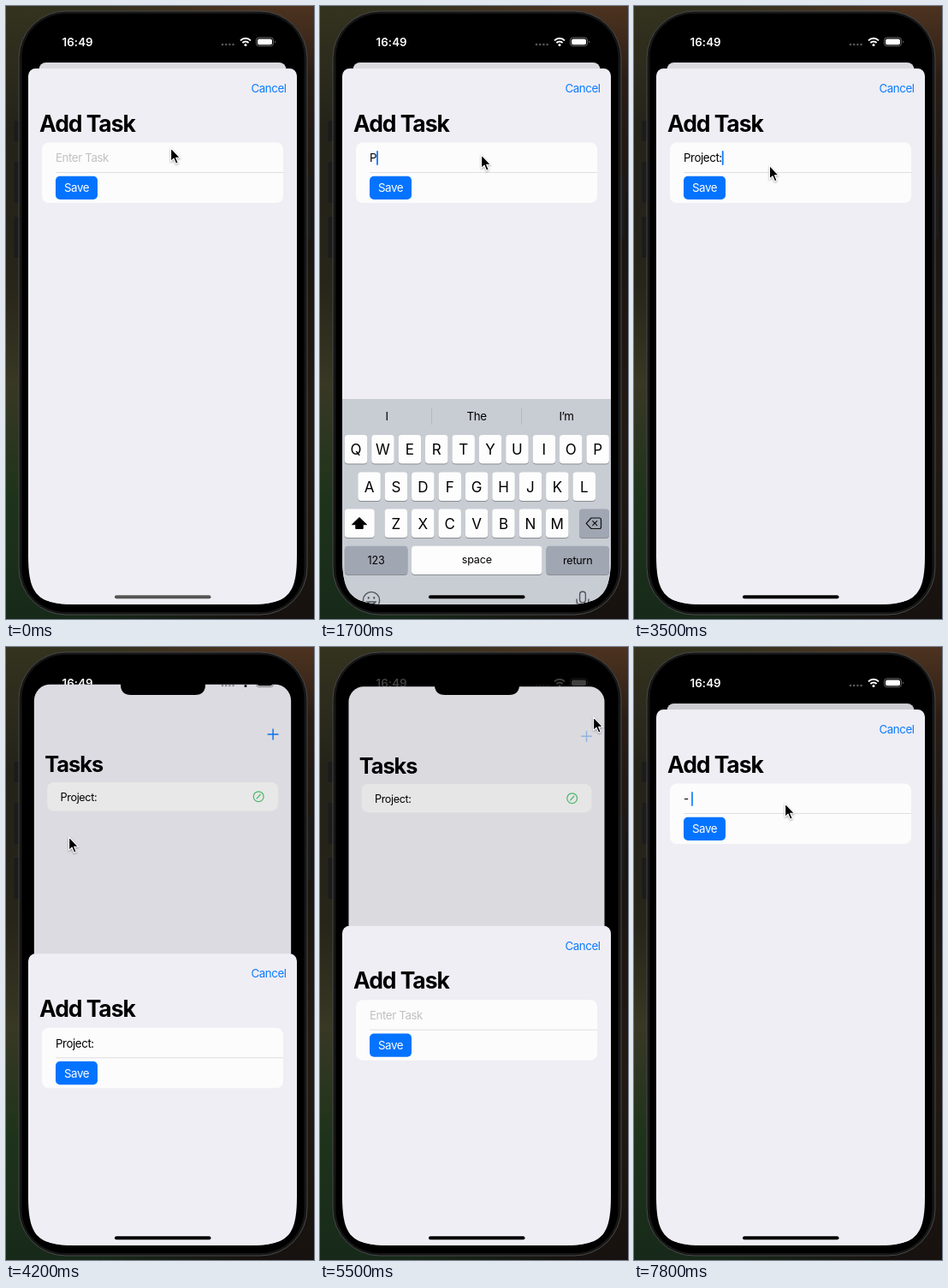
Write an HTML page that moves like this. It is 360 by 716 pixels and loops after 8 s.

```html
<!DOCTYPE html>
<html lang="en">
<head>
<meta charset="utf-8">
<title>Add Task</title>
<style>
  html, body { margin: 0; width: 100%; height: 100%; overflow: hidden; background: #14110f; }
  svg { display: block; width: 360px; height: 716px; }
  text { font: 13.3px Inter, "Liberation Sans", sans-serif; letter-spacing: -.4px; white-space: pre; }
  .title { font-size: 26.5px; font-weight: 700; letter-spacing: -1.05px; }
  .time { font-size: 13.3px; font-weight: 600; letter-spacing: .1px; }
  .blue { fill: #0a7aff; }
  .mid { text-anchor: middle; }
  .key { font-size: 17px; letter-spacing: 0; }
  .word { font-size: 12.6px; letter-spacing: -.2px; }
  #pointer { filter: drop-shadow(0 1px 1px #0005); }
</style>
</head>
<body>
<svg viewBox="0 0 360 716">
  <defs>
    <linearGradient id="left" x2="0" y2="1">
      <stop offset="0" stop-color="#34331f"/><stop offset=".2" stop-color="#24231a"/>
      <stop offset=".45" stop-color="#272419"/><stop offset=".62" stop-color="#383824"/>
      <stop offset=".8" stop-color="#1e331b"/><stop offset="1" stop-color="#172a1a"/>
    </linearGradient>
    <linearGradient id="right" x2="0" y2="1">
      <stop offset="0" stop-color="#4d3320"/><stop offset=".12" stop-color="#2a1d15"/>
      <stop offset=".35" stop-color="#1a1512"/><stop offset=".7" stop-color="#231a13"/>
      <stop offset="1" stop-color="#17120f"/>
    </linearGradient>
    <linearGradient id="blend">
      <stop offset=".3" stop-color="#fff" stop-opacity="0"/><stop offset=".8" stop-color="#fff"/>
    </linearGradient>
    <mask id="fade"><rect width="360" height="716" fill="url(#blend)"/></mask>
    <clipPath id="screen">
      <path d="M26 16H340V641C340 688.5 329.5 699 282 699H84C36.5 699 26 688.5 26 641z"/>
    </clipPath>
    <text id="time" class="time" x="65.5" y="46.5" fill="currentColor">16:49</text>
    <g id="icons">
      <g fill="currentColor">
        <g opacity=".35">
          <circle cx="253" cy="45" r="1.3"/><circle cx="257.2" cy="45" r="1.3"/>
          <circle cx="261.4" cy="45" r="1.3"/><circle cx="265.6" cy="45" r="1.3"/>
        </g>
        <circle cx="280" cy="45.6" r="1.5"/>
        <rect x="294" y="38.4" width="17" height="6.8" rx="2"/>
        <path d="M314 40.2a2 2 0 0 1 0 3.2z" opacity=".5"/>
      </g>
      <path d="M274 40.3a8.4 8.4 0 0 1 12 0M276.4 43a5 5 0 0 1 7.2 0" fill="none" stroke="currentColor" stroke-width="1.9"/>
      <rect x="292.5" y="36.9" width="20" height="9.8" rx="3.2" fill="none" stroke="currentColor" stroke-width=".8" opacity=".5"/>
    </g>
  </defs>

  <rect width="360" height="716" fill="url(#left)"/>
  <rect width="360" height="716" fill="url(#right)" mask="url(#fade)"/>
  <g fill="#1b1b1b">
    <rect x="9.5" y="134" width="6" height="24" rx="1.5"/>
    <rect x="9.5" y="182" width="6" height="48" rx="1.5"/>
    <rect x="9.5" y="246" width="6" height="48" rx="1.5"/>
    <rect x="351" y="196" width="5" height="76" rx="1.5"/>
  </g>
  <rect x="15" y="6" width="337" height="705" rx="55" fill="#161616" stroke="#494949"/>
  <rect x="18.5" y="9" width="330" height="699" rx="51" fill="#000"/>

  <g clip-path="url(#screen)">
    <use id="whiteTime" href="#time" color="#fff"/>
    <use id="whiteIcons" href="#icons" color="#fff"/>
    <g id="main">
      <rect id="mainBg" x="26" y="17" width="314" height="760" fill="#f0eff5"/>
      <path id="plus" d="M311.3 78h13.4M318 71.3v13.4" stroke="#0a7aff" stroke-width="1.5"/>
      <text class="title" x="39" y="124">Tasks</text>
      <rect x="42" y="136.5" width="282" height="35" rx="8" fill="#fdfdfd"/>
      <text x="58" y="159.2">Project:</text>
      <g fill="none" stroke="#55c878" stroke-width="1.3">
        <circle cx="300.3" cy="154" r="6.2"/><path d="M297.8 156.8l5-5.6"/>
      </g>
      <rect id="dim" x="26" y="17" width="314" height="760"/>
    </g>
    <use id="blackTime" href="#time" color="#000"/>
    <use id="blackIcons" href="#icons" color="#000"/>
    <path d="M126 16q8 0 8 8v20q0 12 12 12h75q12 0 12-12v-20q0-8 8-8z"/>

    <g id="sheet">
      <rect x="26" y="73" width="314" height="680" rx="8.5" fill="#efeef4"/>
      <text class="blue" x="327.6" y="101" text-anchor="end">Cancel</text>
      <text class="title" x="39" y="146.7">Add Task</text>
      <rect x="42" y="159.5" width="282" height="70.5" rx="8" fill="#fcfcfc"/>
      <path d="M58 194.5h266" stroke="#dcdcdf" stroke-width=".9"/>
      <text id="hint" x="58" y="182.4" fill="#c0c0c3">Enter Task</text>
      <text id="typed" x="58" y="182.4"></text>
      <rect id="caret" y="169" width="1.8" height="17" rx=".9" class="blue"/>
      <g id="save">
        <rect x="58" y="198.7" width="49" height="27.3" rx="5" fill="#0473ff"/>
        <text class="mid" x="82.5" y="217.4" fill="#fff">Save</text>
      </g>
    </g>

    <g id="keyboard">
      <rect x="26" y="459" width="314" height="245" fill="#c8ccd3"/>
      <g id="keys"></g>
      <path d="M130.5 470v19M235.5 470v19" stroke="#b3b7bf"/>
      <path d="M46 597.5l8.5 8.2h-4.3v4.8h-8.4v-4.8h-4.3z" stroke="#000" stroke-linejoin="round"/>
      <g fill="none" stroke="#111" stroke-width="1.2" stroke-linejoin="round" stroke-linecap="round">
        <path d="M317 598h9.5q2 0 2 2v8.5q0 2-2 2h-9.5l-5.8-6.2zM318.7 601.7l5 5M323.7 601.7l-5 5"/>
      </g>
      <g fill="none" stroke="#50545b" stroke-width="1.4">
        <circle cx="60" cy="694" r="9.6"/><path d="M55 696q5 6 10 0z"/>
        <path d="M56.7 690v2.5M63.3 690v2.5" stroke-width="1.8"/>
        <rect x="303.6" y="684" width="6.8" height="13" rx="3.4"/>
        <path d="M300 692.5v2q0 6 7 6t7-6v-2"/>
      </g>
      <rect id="wash" x="26" y="459" width="314" height="245" fill="#fbfbfb"/>
    </g>
    <rect id="home" x="127" y="688.3" width="112.5" height="4" rx="2"/>
  </g>

  <path id="pointer" d="M.6.8V16.4L4.1 13.2 6.6 19.2 9.2 18.1 6.7 12.2H11.4z" stroke="#fff" stroke-width="1.1" stroke-linejoin="round"/>
</svg>

<script>
const LOOP = 8000, CLOSE = 3919, OPEN = 5162, SLIDE = 600;
const $ = id => document.getElementById(id);
const set = (id, name, value) => $(id).setAttribute(name, value);
const ramp = (t, from, to) => Math.min(1, Math.max(0, (t - from) / (to - from)));
const smooth = u => u * u * (3 - 2 * u);
const easeOut = u => 1 - (1 - u) ** 2;
const mix = (a, b, u) => a + (b - a) * u;

// Keyboard
let keysMarkup = '';
function key(x, y, w, label, fill = '#fdfdfd', cls = 'key', drop = 23.3) {
  keysMarkup += `<rect x="${x}" y="${y + 1}" width="${w}" height="33.4" rx="4" fill="#898c92"/>
    <rect x="${x}" y="${y}" width="${w}" height="33.4" rx="4" fill="${fill}"/>
    <text class="mid ${cls}" x="${x + w / 2}" y="${y + drop}">${label}</text>`;
}
[['QWERTYUIOP', 28.8, 501], ['ASDFGHJKL', 44.3, 544.5], ['ZXCVBNM', 75.6, 587.5]].forEach(([row, x, y]) =>
  [...row].forEach((c, i) => key(x + i * 31.4, y, 26.5, c)));
key(28.8, 587.5, 35, '');
key(303, 587.5, 35, '', '#a0a6b2');
key(28.8, 630.7, 73.6, '123', '#a0a6b2', 'word', 21);
key(107, 630.7, 152.5, 'space', '#fdfdfd', 'word', 20);
key(264.5, 630.7, 73.5, 'return', '#a0a6b2', 'word', 21);
['I', 'The', 'I’m'].forEach((word, i) => {
  keysMarkup += `<text class="mid" x="${78 + i * 105}" y="484">${word}</text>`;
});
$('keys').innerHTML = keysMarkup;

// Pointer stops: time, x, y
const stops = [
  [0, 192, 165], [500, 188, 173], [3350, 188, 173], [3800, 73, 221], [4300, 73, 221],
  [5000, 312, 97], [5250, 312, 97], [5500, 319, 81], [5950, 182, 172], [6100, 182, 172],
  [6450, 176, 182], [LOOP, 176, 182]
];
function pointerAt(t) {
  const i = stops.findIndex(s => s[0] > t);
  const [a, b] = [stops[i - 1], stops[i]];
  const u = smooth(ramp(t, a[0], b[0]));
  return [mix(a[1], b[1], u), mix(a[2], b[2], u)];
}

function typedAt(t) {
  if (t >= 7550) return '- ';
  if (t >= 7400) return '-';
  if (t < 1700 || t > 5000) return '';
  return 'Project:'.slice(0, Math.floor((t - 1700) / 115) + 1);
}

function caretAt(t) {
  if (t < 800 || (t > CLOSE && t < 6450)) return 0;
  if (t >= 1700 && t < 2500) return 1;
  const start = t >= 7400 ? 7290 : t >= 6450 ? 6450 : t >= 2500 ? 2500 : 800;
  const phase = (t - start) % 1000;
  return 1 - ramp(phase, 500, 650) + ramp(phase, 880, 1000);
}

function draw(t) {
  const away = smooth(ramp(t, CLOSE, CLOSE + SLIDE)) - smooth(ramp(t, OPEN, OPEN + SLIDE));
  set('sheet', 'transform', `translate(0 ${627 * away})`);
  set('main', 'transform', `translate(183 ${65 - 49 * away}) scale(${0.92 + 0.08 * away}) translate(-183 -16)`);
  set('mainBg', 'rx', 9 + 24 * away);
  set('dim', 'rx', 9 + 24 * away);
  set('dim', 'opacity', (t < CLOSE ? 0.09 : 0.15) * (1 - away));
  set('plus', 'opacity', t > 5100 ? 0.35 : 1);
  set('save', 'opacity', t > 3820 && t < 3950 ? 0.6 : 1);

  // The status bar turns dark over the task list, its icons before the time
  const whiten = ramp(t, 5400, 5800), unblacken = ramp(t, 5200, 5450);
  set('whiteTime', 'opacity', 1 - ramp(t, 4250, 4500) + whiten);
  set('blackTime', 'opacity', ramp(t, 4250, 4500) - unblacken);
  set('whiteIcons', 'opacity', 1 - ramp(t, 4050, 4180) + whiten);
  set('blackIcons', 'opacity', ramp(t, 4050, 4180) - unblacken);

  const text = typedAt(t);
  $('typed').textContent = text;
  set('hint', 'opacity', text ? 0 : 1);
  set('caret', 'x', 58 + (text ? $('typed').getComputedTextLength() : 0));
  set('caret', 'opacity', caretAt(t));

  const up = easeOut(ramp(t, 750, 1180)) - easeOut(ramp(t, 1900, 2365));
  set('keyboard', 'transform', `translate(0 ${241 * (1 - up)})`);
  set('wash', 'opacity', ramp(t, 1900, 2180));
  const grey = Math.round(85 * (1 - ramp(t, 600, 1000)));
  set('home', 'fill', `rgb(${grey},${grey},${grey})`);
  set('pointer', 'transform', `translate(${pointerAt(t)})`);
}

const begin = performance.now();
function tick() {
  draw((performance.now() - begin) % LOOP);
  requestAnimationFrame(tick);
}
tick();
</script>
</body>
</html>
```
